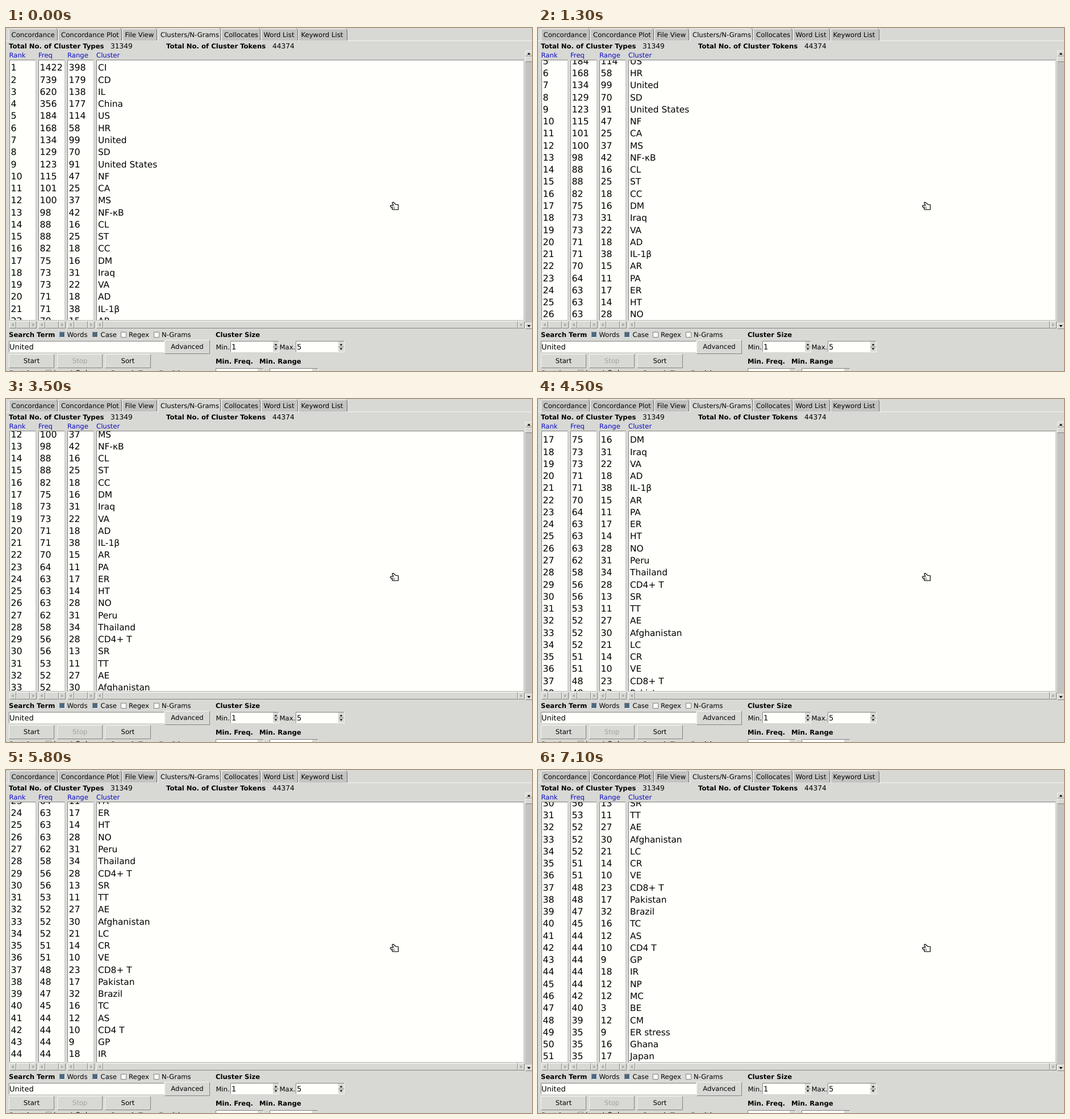
An HTML page for the animation above (8 s loop, 926x605 px).

```html
<!DOCTYPE html>
<html lang="en">
<head>
<meta charset="utf-8">
<title>Cluster list</title>
<style>
html, body { margin: 0; width: 100%; height: 100%; overflow: hidden; background: #d8d8d5; }
svg { display: block; width: 926px; height: 605px; }
text { font: 11.65px "DejaVu Sans", sans-serif; fill: #000; white-space: pre; text-rendering: geometricPrecision; }
.bold { font-weight: bold; }
.blue { fill: #0c0cc4; }
.off { fill: #a2a2a0; }
.mid { text-anchor: middle; }
.num { font-size: 12.2px; }
.entry { font-size: 13px; }
.cell { font-size: 15.8px; }
.word { font-size: 15.4px; }
</style>
</head>
<body>
<svg id="stage" viewBox="0 0 926 605">
  <defs><clipPath id="view"><path d="M7 57H52V515H7zM58 57H103V515H58zM109 57H154V515H109zM160 57H911V515H160z"/></clipPath></defs>
  <g id="ui"></g>
  <g clip-path="url(#view)"><g id="rows"></g></g>
  <g id="hand" stroke="#000" stroke-width="1.2" stroke-linejoin="round">
    <path fill="#fffffb" d="M680.500 307.500Q682.500 307 684 309.500L687 311.500H690.500V320.500H681Q679.500 320 680 318.500Q678.800 317.500 679.500 316H677.500Q675.800 314.300 677.500 312.800H682L680.300 309.500Q679.500 308 680.500 307.500z"/>
    <path fill="none" stroke-width="1" stroke-dasharray="1.500 1" d="M680 316H685M681 318.300H685"/>
  </g>
</svg>
<script>
const BG = '#d8d8d5', PAPER = '#fffffb', TROUGH = '#c3c3c1', DARK = '#828280', LIGHT = '#f6f6f3';
const ROW = 21.266, SCROLL = 48.333, LOOP = 8000;

// [time in ms, wheel notches scrolled so far]
const STEPS = [[0, 0], [1100, 1], [1300, 2], [2300, 3], [2800, 4], [3500, 5], [4000, 6], [4500, 7],
  [5100, 8], [5200, 9], [5800, 10], [6300, 11], [6500, 12], [7100, 13]];

const DATA = `1422 398 CI|739 179 CD|620 138 IL|356 177 China|184 114 US|168 58 HR|134 99 United|129 70 SD
123 91 United States|115 47 NF|101 25 CA|100 37 MS|98 42 NF-κB|88 16 CL|88 25 ST|82 18 CC|75 16 DM|73 31 Iraq
73 22 VA|71 18 AD|71 38 IL-1β|70 15 AR|64 11 PA|63 17 ER|63 14 HT|63 28 NO|62 31 Peru|58 34 Thailand|56 28 CD4+ T
56 13 SR|53 11 TT|52 27 AE|52 30 Afghanistan|52 21 LC|51 14 CR|51 10 VE|48 23 CD8+ T|48 17 Pakistan|47 32 Brazil
45 16 TC|44 12 AS|44 10 CD4 T|44 9 GP|44 18 IR|44 12 NP|42 12 MC|40 3 BE|39 12 CM|35 9 ER stress|35 16 Ghana|35 17 Japan`;

const ui = document.getElementById('ui');
const rows = document.getElementById('rows');

function add(tag, attrs, parent = ui) {
  const el = document.createElementNS('http://www.w3.org/2000/svg', tag);
  for (const key in attrs) el.setAttribute(key, attrs[key]);
  return parent.appendChild(el);
}
function text(x, y, str, cls = '', parent = ui) {
  add('text', { x, y, class: cls }, parent).textContent = str;
}
function rect(x, y, x2, y2, fill) {
  add('rect', { x, y, width: x2 - x, height: y2 - y, fill });
}
function path(d, stroke, fill = 'none') {
  add('path', { d, stroke, fill });
}
function bevel(x, y, x2, y2, fill, lit, shade) {
  rect(x, y, x2, y2, fill);
  path(`M${x + .5} ${y2 - .5}V${y + .5}H${x2 - .5}`, lit);
  path(`M${x2 - .5} ${y + .5}V${y2 - .5}H${x + .5}`, shade);
}
const raised = (x, y, x2, y2) => bevel(x, y, x2, y2, BG, LIGHT, DARK);
const sunken = (x, y, x2, y2, fill = PAPER) => bevel(x, y, x2, y2, fill, DARK, LIGHT);

function arrow(x, y, turn, fill, size = 3) {
  add('path', { d: `M${-size} ${size / 2}L0 ${-size / 2 - .5}L${size} ${size / 2}z`, fill,
    transform: `translate(${x} ${y}) rotate(${turn})` });
}
function tab(x, x2, textX, label, active) {
  const top = active ? .5 : 1.5;
  const shape = `M${x + .5} 22.500V${top + 2}L${x + 2.5} ${top}H${x2 - 2.5}`;
  path(`${shape}L${x2 - .5} ${top + 2}V22.500`, 'none', active ? BG : TROUGH);
  path(shape, LIGHT);
  path(`M${x2 - 2.5} ${top}L${x2 - .5} ${top + 2}V22`, '#6e6e6c');
  text(textX, 16.2, label);
}
function hbar(x, x2) {
  rect(x, 517, x2, 530, TROUGH);
  raised(x, 517, x + 12, 530);
  raised(x2 - 12, 517, x2, 530);
  raised(x + 12, 517, x2 - 12, 530);
  arrow(x + 6, 523.5, -90, '#a0a09e');
  arrow(x2 - 6, 523.5, 90, '#a0a09e');
}
function check(x, y, label, textX, on) {
  sunken(x, y, x + 10, y + 10, on ? '#4a6984' : PAPER);
  if (!on) path(`M${x + .5} ${y + .5}h9v9h-9z`, DARK);
  text(textX, y + 9, label);
}
function spin(x, x2, y, value) {
  sunken(x, y, x2, y + 20);
  rect(x2 - 11, y + 1, x2 - 1, y + 19, BG);
  arrow(x2 - 6, y + 6.5, 0, '#000', 2.5);
  arrow(x2 - 6, y + 14, 180, '#000', 2.5);
  path(`M${x2 - 11} ${y + 10.5}h10`, DARK);
  text(x + 2, y + 14.5, value, 'entry');
}
function button(x, x2, y, label, cls = '') {
  raised(x, y, x2, y + 25);
  text((x + x2) / 2, y + 16.2, label, 'mid ' + cls);
}

rect(0, 0, 926, 605, BG);
path('M0 22.500H268M378 22.500H926', LIGHT);
tab(5, 91, 9.5, 'Concordance');
tab(92, 204, 97, 'Concordance Plot');
tab(205, 266, 209.5, 'File View');
tab(267, 378, 272, 'Clusters/N-Grams', true);
tab(379, 448, 384, 'Collocates');
tab(449, 514, 453.5, 'Word List');
tab(515, 601, 519.5, 'Keyword List');

text(5, 35.5, 'Total No. of Cluster Types', 'bold');
text(184, 35.5, '31349', 'num');
text(282, 35.5, 'Total No. of Cluster Tokens', 'bold');
text(469, 35.5, '44374', 'num');

for (const [x, x2, label] of [[6, 54, 'Rank'], [57, 105, 'Freq'], [108, 156, 'Range'], [159, 913, 'Cluster']]) {
  text(x - (x < 10 ? .5 : 0), 52, label, 'blue');
  bevel(x, 56, x2 - 1, 516, PAPER, DARK, TROUGH);
  hbar(x, x2);
}

rect(914, 40, 926, 531, TROUGH);
raised(914, 40, 927, 50);
raised(914, 50, 927, 60);
raised(914, 520, 927, 531);
arrow(920.5, 45.5, 0, '#000');
arrow(920.5, 525.5, 180, '#000');

text(5, 545, 'Search Term', 'bold');
check(94, 536, 'Words', 107.5, true);
check(152, 536, 'Case', 166.5, true);
check(202, 536, 'Regex', 216);
check(260, 536, 'N-Grams', 274);
text(369, 545, 'Cluster Size', 'bold');

sunken(5, 552, 279, 572);
text(6, 566.5, 'United', 'entry');
button(279, 359, 550, 'Advanced');
text(369.5, 566.5, 'Min.');
spin(395, 481, 552, '1');
text(481.5, 566.5, 'Max.');
spin(510, 596, 552, '5');

button(5, 85, 575, 'Start');
button(90, 170, 575, 'Stop', 'off');
button(174, 255, 575, 'Sort');
text(369, 591.5, 'Min. Freq.', 'bold');
text(446, 591.5, 'Min. Range', 'bold');

text(5, 612.5, 'Sort by', 'bold');
check(70, 603, 'Invert Order', 84);
text(184, 612.5, 'Search Term Position', 'bold');
spin(369, 454, 600, '1');
spin(464, 550, 600, '1');

DATA.split(/[|\n]/).forEach((line, i) => {
  const [, freq, range, word] = line.match(/(\d+) (\d+) (.+)/);
  const y = 75.4 + i * ROW;
  text(8.5, y, i + 1, 'cell', rows);
  text(59.5, y, freq, 'cell', rows);
  text(110.5, y, range, 'cell', rows);
  text(162, y, word, 'word', rows);
});

function draw(now) {
  const t = now % LOOP;
  const notches = STEPS.filter(([at]) => at <= t).pop()[1];
  rows.setAttribute('transform', `translate(0 ${-notches * SCROLL})`);
}
const start = performance.now();
function tick() {
  draw(performance.now() - start);
  requestAnimationFrame(tick);
}
tick();
</script>
</body>
</html>
```
